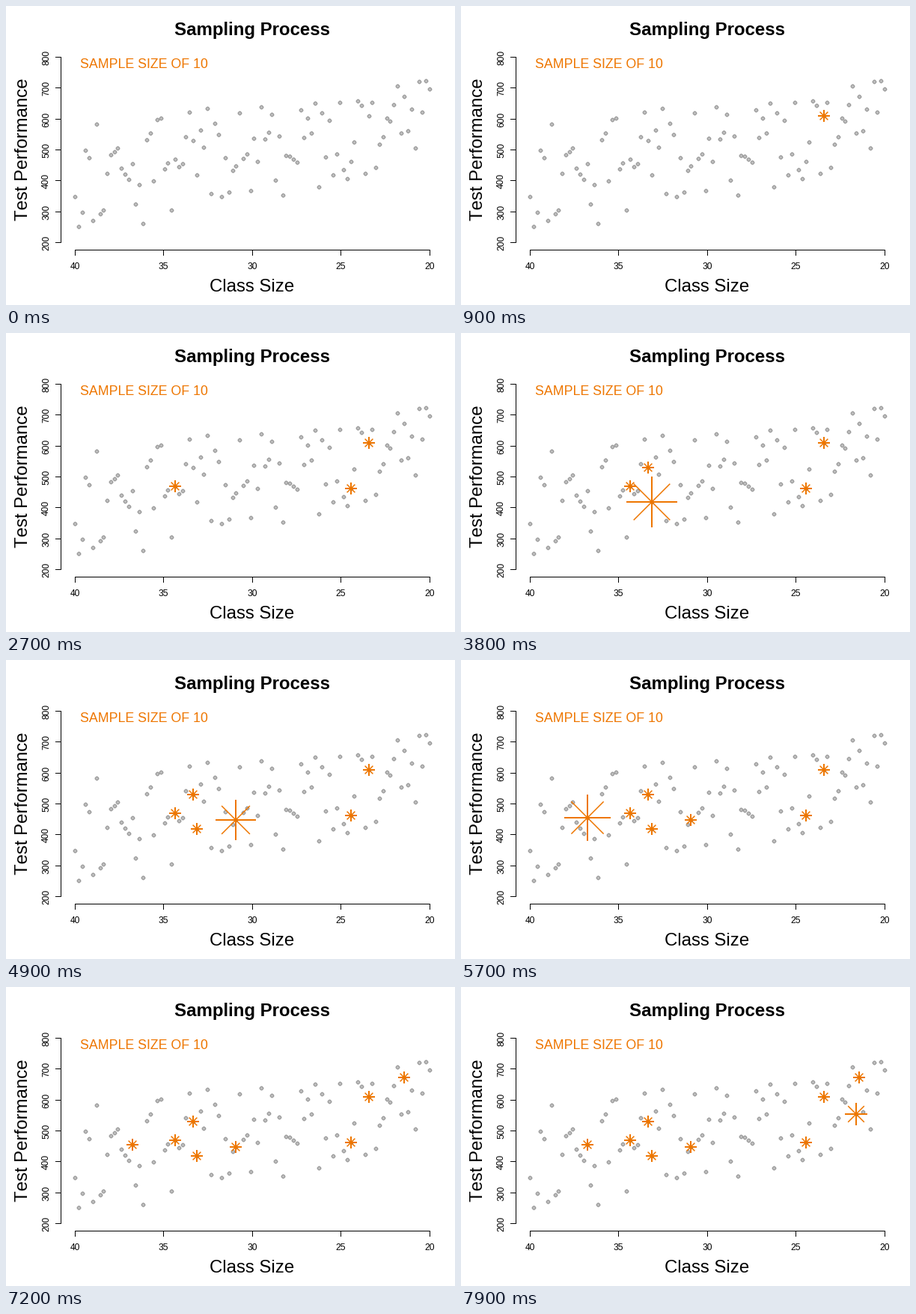
Write a matplotlib script that moves like this. It is 600 by 400 pixels and loops after 8000 ms.

```python
import matplotlib.pyplot as plt
import numpy as np
from matplotlib.animation import FuncAnimation
from matplotlib.collections import LineCollection

W, H, DPI = 600, 400, 100
PX = 72 / DPI  # points per pixel
ORANGE = "#ee7600"
COUNT = 100    # observations
STEPS = 9      # frames each star takes to shrink
FRAMES = 80

plt.rcParams["font.family"] = "Liberation Sans"
plt.rcParams["text.kerning_factor"] = 6

# Drawn observations in order: index and height in pixels from the top
SAMPLE = {82: 147, 28: 205, 77: 208, 33: 180, 34: 226,
          45: 214, 16: 211, 92: 121, 91: 170}

# Evenly spaced class sizes, scores scattered around a rising trend
rng = np.random.default_rng(7)
t = np.linspace(0, 1, COUNT)
xs = np.round(92 + 474 * t)
ys = np.round(236 - 80 * t + (75 - 15 * t) * rng.uniform(-1, 1, COUNT))
for i, y in SAMPLE.items():
    ys[i] = y

fig = plt.figure(figsize=(W / DPI, H / DPI), dpi=DPI, facecolor="white")
ax = fig.add_axes([0, 0, 1, 1])
ax.set_xlim(0, W)
ax.set_ylim(H, 0)
ax.axis("off")


def line(x0, y0, x1, y1):
    ax.plot([x0, x1], [y0, y1], color="black", lw=PX,
            solid_capstyle="projecting")


def label(x, y, text, size, color="black", rotation=0, weight="normal"):
    ax.text(x, y, text, fontsize=size * PX, color=color, rotation=rotation,
            weight=weight, ha="center", va="baseline",
            rotation_mode="anchor")


def star(i, cex):
    """Four strokes: an upright cross and a shorter diagonal one."""
    x, y = xs[i], ys[i]
    d = 4.5 * cex
    r = d * np.sqrt(2)
    return [[(x - dx, y - dy), (x + dx, y + dy)]
            for dx, dy in ((r, 0), (0, r), (d, d), (d, -d))]


# Axes
line(92, 326, 566, 326)
for k in range(5):
    x = 92 + 237 * k // 2
    line(x, 326, x, 333)
    label(x, 352, str(40 - 5 * k), 12)

line(73, 68, 73, 316)
for k in range(7):
    y = round(316 - 41.33 * k)
    line(66, y, 73, y)
    label(57, y + 0.5, str(200 + 100 * k), 12, rotation=90)

label(329, 39, "Sampling Process", 24, weight="bold")
label(328.5, 382, "Class Size", 24)
label(29, 191.5, "Test Performance", 24, rotation=90)
label(184.5, 83, "SAMPLE SIZE OF 10", 17.8, color=ORANGE)

# Observations
a, b = 2.4, 0.6
dot = [(a, b), (b, a), (-b, a), (-a, b), (-a, -b), (-b, -a), (b, -a),
       (a, -b), (a, b)]
ax.plot(xs, ys, ls="none", marker=dot, ms=2 * a * PX, mew=PX,
        mfc="#bebebe", mec="#929292")

# Diagonal strokes are thinner than upright ones
widths = [w * PX for w in (2, 2, 1.5, 1.5)]
stars = LineCollection([], colors=ORANGE, linewidths=widths,
                       capstyle="butt", zorder=5)
ax.add_collection(stars, autolim=False)


def draw(frame):
    strokes = []
    for n, i in enumerate(SAMPLE):
        step = frame - 1 - n * STEPS
        if step >= 0:
            strokes += star(i, 6 - 0.6 * min(step, STEPS - 1))
    stars.set_segments(strokes)
    return [stars]


anim = FuncAnimation(fig, draw, frames=FRAMES, interval=100, repeat=True,
                     repeat_delay=0, blit=False)
plt.show()
```
